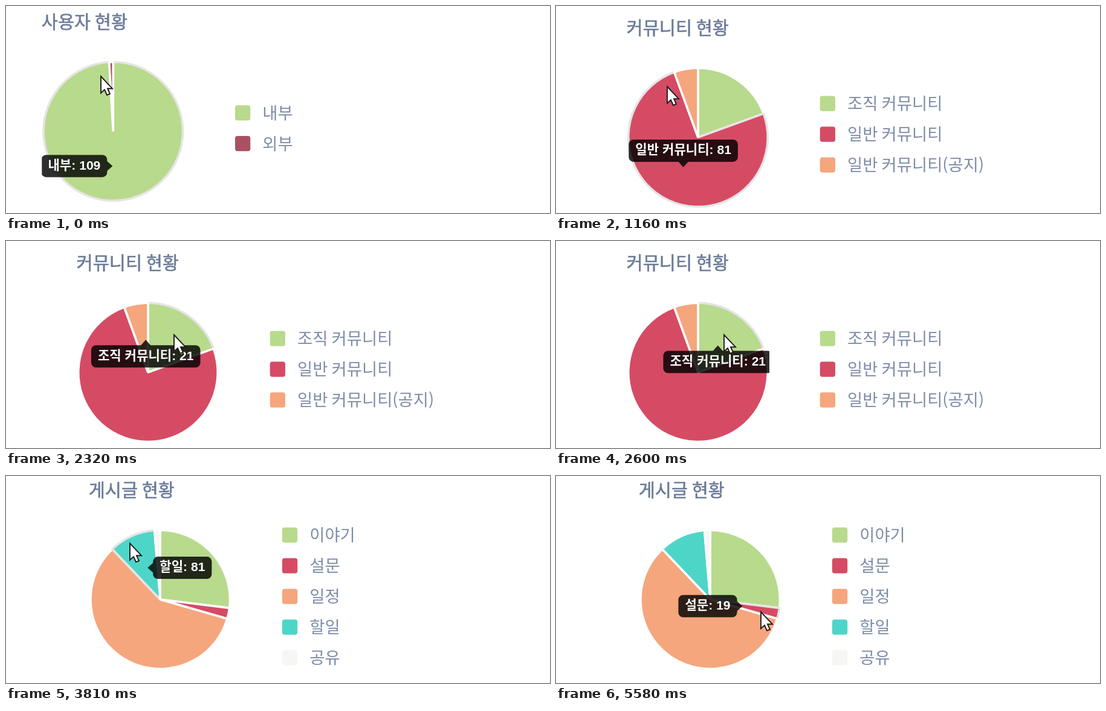
An HTML page with a canvas for the animation above (6640 ms loop, 900 px wide and 344 px high).

```html
<!DOCTYPE html>
<html lang="ko">
<head>
<meta charset="utf-8">
<style>
html, body { margin: 0; width: 900px; height: 344px; overflow: hidden; background: #fff; }
canvas { display: block; }
</style>
</head>
<body>
<canvas id="stage" width="900" height="344"></canvas>
<script>
const ctx = document.getElementById('stage').getContext('2d');
const LOOP = 6640, GLIDE = 140, SETTLE = 400, RADIUS = 115.3;
const CJK = '"Noto Sans CJK KR", "Noto Sans CJK", sans-serif';
const TIP_FONT = 'bold 21.1px "Liberation Sans", ' + CJK;
const GREEN = '#b8da8c', RED = '#d64b64', ORANGE = '#f5a67d';

// slices: label, value, colour, optional tooltip label
const charts = [
  { title: '사용자 현황', cx: 177.3, cy: 208.3, slices: [
    ['내부', 109, GREEN], ['외부', 1, '#a95163']] },
  { title: '커뮤니티 현황', cx: 235, cy: 218.3, slices: [
    ['조직 커뮤니티', 21, GREEN], ['일반 커뮤니티', 81, RED],
    ['일반 커뮤니티(공지)', 6, ORANGE, '일반 커뮤니티']] },
  { title: '게시글 현황', cx: 255.2, cy: 205.2, slices: [
    ['이야기', 203, GREEN], ['설문', 19, RED], ['일정', 440, ORANGE],
    ['할일', 81, '#4dd6c8'], ['공유', 10, '#f6f6f5']] }
];

// The pointer arrives at each stop and hovers a slice: time, chart, slice, x, y
const stops = [
  [0, 0, 0, 157, 117], [340, 0, 0, 168, 114], [480, 0, 1, 173, 113],
  [1160, 1, 1, 184, 134], [1310, 1, 2, 206, 123], [2320, 1, 0, 278, 156],
  [2930, 2, 2, 165, 150], [3183, 2, 3, 186, 127], [3810, 2, 3, 205, 112],
  [4030, 2, 4, 249, 122], [4596, 2, 0, 297, 150], [5310, 2, 1, 339, 226]
].map(([at, chart, slice, x, y]) => ({ at, chart, slice, x, y }));

const clamp = p => Math.max(0, Math.min(1, p));
const lerp = (a, b, p) => a + (b - a) * p;
const easeOutQuart = p => 1 - (1 - p) ** 4;

for (const c of charts) {
  const total = c.slices.reduce((sum, s) => sum + s[1], 0);
  let a = -Math.PI / 2;
  c.arcs = c.slices.map(s => ({ from: a, to: a += s[1] / total * 2 * Math.PI }));
}

function text(str, x, y, font, color) {
  ctx.font = font;
  ctx.fillStyle = color;
  ctx.fillText(str, x, y);
}

function drawChart({ title, cx, cy, slices, arcs }, active) {
  text(title, cx - 118.5, cy - 182.3, '29.5px ' + CJK, '#6b7b98');
  ctx.strokeStyle = '#6b7b98';
  ctx.lineWidth = 0.6;
  ctx.strokeText(title, cx - 118.5, cy - 182.3);

  ctx.lineWidth = 3.6;
  ctx.lineJoin = 'bevel';
  slices.forEach(([label, , color], i) => {
    ctx.fillStyle = color;
    ctx.strokeStyle = i === active ? '#e6e4e6' : '#fff';
    ctx.beginPath();
    ctx.arc(cx, cy, RADIUS, arcs[i].from, arcs[i].to);
    ctx.lineTo(cx, cy);
    ctx.closePath();
    ctx.fill();
    ctx.stroke();

    const y = cy - 5.3 + (i - (slices.length - 1) / 2) * 51;
    ctx.beginPath();
    ctx.roundRect(cx + 201.7, y - 12.5, 25.3, 25.3, 4);
    ctx.fill();
    text(label, cx + 247, y, '27.4px ' + CJK, '#7d8ca8');
  });
}

// Place a tooltip beside its slice; (dx, dy) is where its caret points
function tipBox(c, i) {
  const [name, value, , alias = name] = c.slices[i];
  const label = alias + ': ' + value;
  ctx.font = TIP_FONT;
  const w = ctx.measureText(label).width + 22, h = 37, gap = 11.6;
  const mid = (c.arcs[i].from + c.arcs[i].to) / 2;
  const px = Math.cos(mid) * RADIUS / 2, py = Math.sin(mid) * RADIUS / 2;
  const [dx, dy] = w > 150 ? [0, py < 0 ? -1 : 1] : [px < 0 ? -1 : 1, 0];
  return {
    label, w, h, dx, dy,
    x: c.cx + px - dx * (gap + w / 2) - w / 2,
    y: c.cy + py - dy * (gap + h / 2) - h / 2
  };
}

function drawTip(c, { label, w, h, dx, dy }, x, y) {
  const mx = x + w / 2, my = y + h / 2;
  const ex = mx + dx * w / 2, ey = my + dy * h / 2;
  ctx.save();
  ctx.beginPath();
  ctx.rect(c.cx - 118, c.cy - 118, 236, 236);
  ctx.clip();
  ctx.fillStyle = 'rgba(0,0,0,.82)';
  ctx.beginPath();
  ctx.roundRect(x, y, w, h, 8);
  ctx.moveTo(ex + 8 * dy, ey + 8 * dx);
  ctx.lineTo(ex + 9 * dx, ey + 9 * dy);
  ctx.lineTo(ex - 8 * dy, ey - 8 * dx);
  ctx.fill();
  text(label, x + 11, my, TIP_FONT, '#fff');
  ctx.restore();
}

const arrow = new Path2D('M0 0V27.5L6 22 10 31 15 29 11 20.2H19Z');

function drawPointer(x, y) {
  ctx.save();
  ctx.translate(x, y);
  ctx.lineJoin = 'miter';
  ctx.lineWidth = 1.9;
  ctx.fillStyle = '#fff';
  ctx.strokeStyle = '#1c1c1c';
  ctx.fill(arrow);
  ctx.stroke(arrow);
  ctx.restore();
}

function draw(t) {
  ctx.fillStyle = '#fff';
  ctx.fillRect(0, 0, 900, 344);
  ctx.textBaseline = 'middle';

  // Stops outside the current chart do not take part in its motion
  const n = stops.findLastIndex(s => s.at <= t), now = stops[n];
  const near = s => s && s.chart === now.chart ? s : now;
  const before = near(stops[n - 1]), next = near(stops[n + 1]);

  const c = charts[now.chart];
  drawChart(c, now.slice);
  const old = tipBox(c, before.slice), tip = tipBox(c, now.slice);
  const shift = easeOutQuart(clamp((t - now.at) / SETTLE));
  drawTip(c, tip, lerp(old.x, tip.x, shift), lerp(old.y, tip.y, shift));

  const glide = clamp(1 - (next.at - t) / GLIDE);
  drawPointer(lerp(now.x, next.x, glide), lerp(now.y, next.y, glide));
}

const origin = performance.now();
function tick() {
  draw((performance.now() - origin) % LOOP);
  requestAnimationFrame(tick);
}
tick();
</script>
</body>
</html>
```
